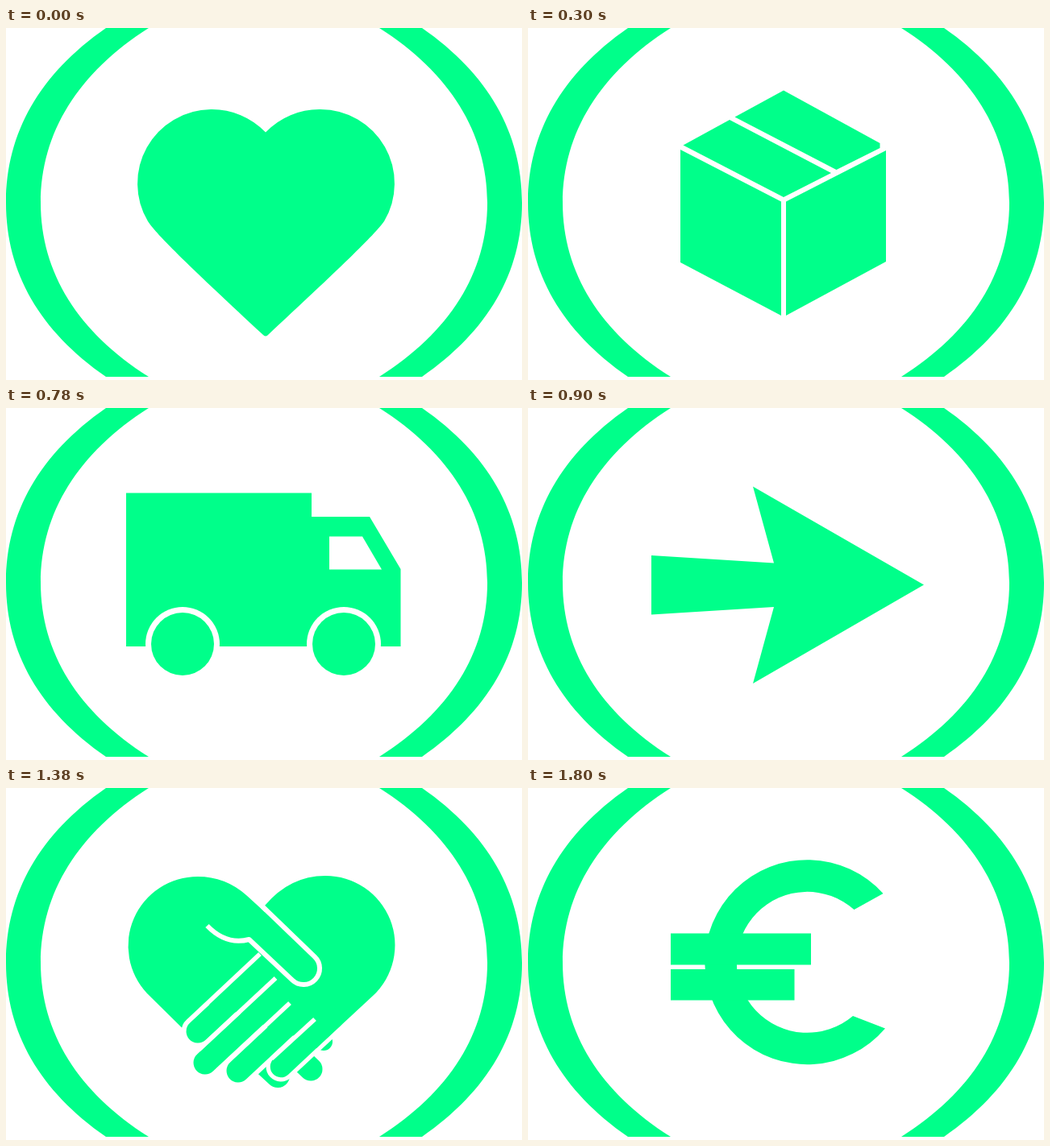
Recreate the animation shown at these times as an HTML page with a canvas. Size 640 by 437 pixels, loop 2100 ms.

```html
<!DOCTYPE html>
<html lang="en">
<head>
<meta charset="utf-8">
<title>Icon loop</title>
<style>
html, body { margin: 0; width: 100%; height: 100%; overflow: hidden; background: #fff; }
canvas { display: block; width: 640px; height: 437px; }
</style>
</head>
<body>
<canvas id="stage" width="640" height="437"></canvas>
<script>
const ctx = document.getElementById('stage').getContext('2d');
const GREEN = '#00ff8a', WHITE = '#fff';
const STEP = 300;

function fill(path, color = GREEN) {
  ctx.fillStyle = color;
  ctx.fill(new Path2D(path));
}

function line(path, width, color = WHITE, cap = 'butt') {
  ctx.strokeStyle = color;
  ctx.lineWidth = width;
  ctx.lineCap = cap;
  ctx.lineJoin = 'round';
  ctx.stroke(new Path2D(path));
}

function disc(x, y, r, color = GREEN) {
  ctx.fillStyle = color;
  ctx.beginPath();
  ctx.arc(x, y, r, 0, Math.PI * 2);
  ctx.fill();
}

// Round-ended bar from a fingertip (x, y) along (dx, dy)
function finger(x, y, dx, dy, r, color = GREEN) {
  line(`M${x} ${y}l${dx} ${dy}`, r * 2, color, 'round');
}

function brackets() {
  const half = 'M124 0C42 57 0 130 0 217C0 304 42 376 124 433H177C90 378 43 304 43 217C43 130 90 55 177 0Z';
  fill(half);
  ctx.save();
  ctx.translate(640, 0);
  ctx.scale(-1, 1);
  fill(half);
  ctx.restore();
}

function heart() {
  fill('M322 129.5A92 92 0 0 0 254 101A92 92 0 0 0 176 240C186 256 232 300 319 381Q322 384 325 381' +
    'C412 300 458 256 469 240A92 92 0 0 0 390 101A92 92 0 0 0 322 129.5Z');
}

function box() {
  fill('M317 77.5L436.500 143V149L382.500 176L256.500 110.500Z');
  fill('M250 114L376 180L317 210L192.500 145.500Z');
  fill('M189 151L314 215.500V357L189 291Z');
  fill('M320 215.500L444 152V290L320 357Z');
}

function truck() {
  fill('M149 105.500H379V135H451L489.500 200V296H149Z');
  fill('M401 159.500H442L466 200.500H401Z', WHITE);
  for (const x of [219, 419]) {
    disc(x, 293, 46, WHITE);
    disc(x, 293, 39);
  }
}

function arrow() {
  fill('M279 97.500L491 219.500L279 342L305 247L153 256.500V183L305 192.500Z');
}

function handshake() {
  // tips of the hand behind
  finger(337, 357, -27, -25, 15);
  finger(378, 349, -20, -19, 14.5);
  disc(394, 315, 11);

  // fingers of the hand in front
  finger(288, 351, 73, -68, 20, WHITE);
  finger(341, 346, 73, -68, 18.5, WHITE);
  finger(238, 302, 73, -68, 14.5);
  finger(247, 341, 73, -68, 14.5);
  finger(288, 351, 62, -58, 14.5);

  // both palms
  fill('M321 146Q352 109 396 109A86 86 0 0 1 455 258L385 323L365 310L330 300L290 280L250 268' +
    'L218.500 298L175 255A86 86 0 0 1 238 110Q272 110 298 133L321 154Z');
  finger(341, 346, 64, -60, 13.3);

  // creases
  line('M315 206L226 289.500Q220 295 220.500 302', 5.5);
  line('M334.500 236L239 325', 5.5);
  line('M352 267L263 350', 5.5);
  line('M383 287L329.500 336', 5.5);

  // thumb
  line('M318 147L382.700 209.400A20 20 0 0 1 355.300 238.600L301.500 188C283 193 265 187 249.500 171', 6);
}

function check() {
  fill('M222.500 190L291 273.500L423 90L486.500 143.500L292.500 343.500L177 255Z');
}

function euro() {
  fill('M440.500 131A127 127 0 1 0 443 298.500L403 283A87.500 87.500 0 1 1 404.500 151Z');
  fill('M177 180.500H351V219.500H177ZM177 225H330.500V263.500H177Z');
}

const icons = [heart, box, truck, arrow, handshake, check, euro];
const start = performance.now();

function draw(now) {
  const t = Math.max(0, now - start);
  ctx.fillStyle = WHITE;
  ctx.fillRect(0, 0, 640, 437);
  brackets();
  icons[Math.floor(t / STEP) % icons.length]();
  requestAnimationFrame(draw);
}
draw(start);
</script>
</body>
</html>
```
